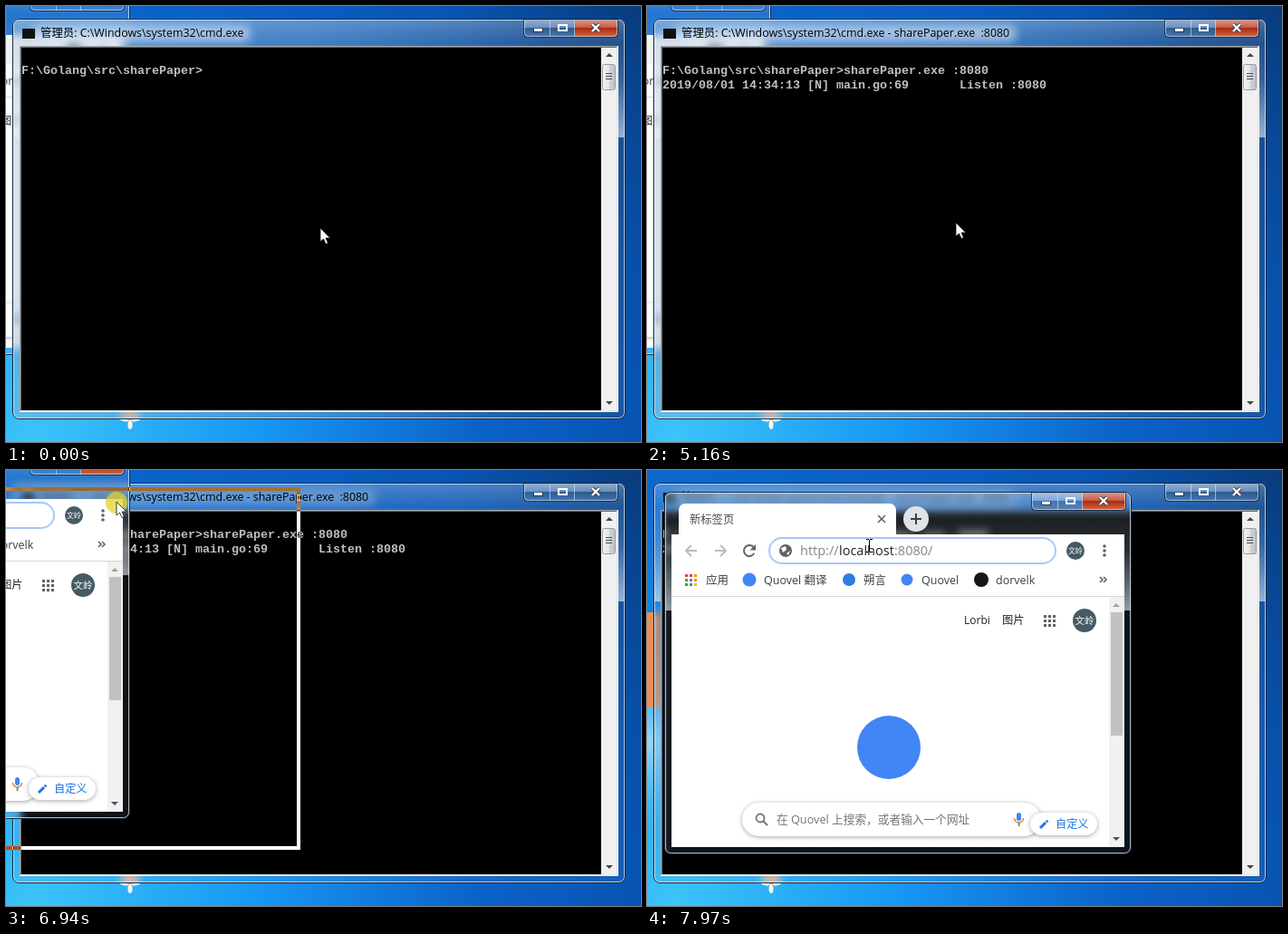
Write an HTML page with a canvas that moves like this. It is 701 by 481 pixels and loops after 8 s.

```html
<!DOCTYPE html>
<html lang="zh">
<head>
<meta charset="utf-8">
<style>
  html, body { margin: 0; width: 100%; height: 100%; overflow: hidden; background: #0c62c8; }
  canvas { display: block; }
</style>
</head>
<body>
<canvas id="stage" width="701" height="481"></canvas>
<script>
const canvas = document.getElementById('stage');
const ctx = canvas.getContext('2d');
const LOOP = 8000;
const UI = '"Open Sans", "Noto Sans CJK SC", "Noto Sans CJK", sans-serif';
const MONO = '"Liberation Mono", monospace';
const PROMPT = 'F:\\Golang\\src\\sharePaper>';
const COMMAND = 'sharePaper.exe';

// [start, typed text, caret shown]
const TYPING = [
  [0, '', 0], [360, 's', 0], [440, 'sh', 0], [530, 'sha', 0], [610, COMMAND, 0],
  [1500, COMMAND, 1], [1840, COMMAND, 0], [2020, COMMAND + ' ', 1], [2450, COMMAND + ' ', 0],
  [2580, COMMAND + ' :', 1], [3030, COMMAND + ' :', 0], [3125, COMMAND + ' :8', 1],
  [3220, COMMAND + ' :80', 0], [3480, COMMAND + ' :808', 0], [3600, COMMAND + ' :808', 1],
  [3770, COMMAND + ' :8080', 0]
];

const lerp = (a, b, p) => a + (b - a) * p;

// Progress from 0 to 1 in n equal jumps, the first at a and the last at b.
const steps = (t, a, b, n) => t < a ? 0 :
  Math.min(1, (Math.floor((t - a) / (b - a) * (n - 1) + 1e-6) + 1) / n);

function rect(x, y, w, h, fill) {
  ctx.fillStyle = fill;
  ctx.fillRect(x, y, w, h);
}
function pill(x, y, w, h, r, fill, stroke, width = 1) {
  ctx.beginPath();
  ctx.roundRect(x, y, w, h, r);
  if (fill) { ctx.fillStyle = fill; ctx.fill(); }
  if (stroke) { ctx.strokeStyle = stroke; ctx.lineWidth = width; ctx.stroke(); }
}
function disc(x, y, r, fill) {
  ctx.beginPath();
  ctx.arc(x, y, r, 0, 7);
  ctx.fillStyle = fill;
  ctx.fill();
}
function poly(points, fill) {
  ctx.beginPath();
  points.forEach(([x, y]) => ctx.lineTo(x, y));
  ctx.closePath();
  ctx.fillStyle = fill;
  ctx.fill();
}
function line(points, color, width) {
  ctx.beginPath();
  points.forEach(([x, y]) => ctx.lineTo(x, y));
  ctx.strokeStyle = color;
  ctx.lineWidth = width;
  ctx.stroke();
}
function arc(x, y, r, from, to, color, width) {
  ctx.beginPath();
  ctx.arc(x, y, r, from, to);
  ctx.strokeStyle = color;
  ctx.lineWidth = width;
  ctx.stroke();
}
function text(s, x, y, size, color, font = UI) {
  ctx.font = size + 'px ' + font;
  ctx.fillStyle = color;
  ctx.fillText(s, x, y);
}
function gradient(fill, stops) {
  stops.forEach(([at, color]) => fill.addColorStop(at, color));
  return fill;
}
function shadowPill(x, y, w, h) {
  ctx.save();
  ctx.shadowColor = 'rgba(0,0,0,.35)';
  ctx.shadowBlur = 5;
  ctx.shadowOffsetY = 1;
  pill(x, y, w, h, h / 2, '#fff');
  ctx.restore();
}

function wallpaper() {
  rect(0, 0, 701, 481, gradient(ctx.createRadialGradient(30, 480, 0, 30, 480, 820), [
    [0, '#3cc4fa'], [.3, '#1897f4'], [.6, '#0b62c8'], [.8, '#0855b4'], [1, '#083c7c']
  ]));
  disc(0, 300, 100, gradient(ctx.createRadialGradient(0, 300, 0, 0, 300, 100), [
    [0, 'rgba(200,238,255,.7)'], [1, 'rgba(120,205,250,0)']
  ]));
  rect(-90, 157, 105, 105, '#ee8f55');
  disc(137, 449, 9, '#e8b088');
  [[137, 462, 2.5, 5, 0], [130, 456, 5, 2.2, .3], [144, 456, 5, 2.2, -.3]].forEach(petal => {
    ctx.beginPath();
    ctx.ellipse(...petal, 0, 7);
    ctx.fillStyle = '#fff4e6';
    ctx.fill();
  });
}

// Blurred translucent window frame; tint is a list of colour stops from left to right.
function glass(x, y, w, h, tint = []) {
  ctx.save();
  ctx.beginPath();
  ctx.roundRect(x, y, w, h, 7);
  ctx.clip();
  ctx.save();
  ctx.resetTransform();
  ctx.filter = 'blur(4px)';
  ctx.drawImage(canvas, 0, 0);
  ctx.restore();
  rect(x, y, w, h, gradient(ctx.createLinearGradient(x, 0, x + w, 0), tint));
  const sheen = 131 / h;
  rect(x, y, w, h, gradient(ctx.createLinearGradient(0, y, 0, y + h), [
    [0, 'rgba(210,225,240,.34)'], [.06, 'rgba(190,210,230,.14)'], [sheen * .5, 'rgba(200,215,230,.22)'],
    [sheen, 'rgba(225,235,245,.65)'], [sheen, 'rgba(120,160,200,.12)'], [1, 'rgba(120,160,200,.12)']
  ]));
  ctx.restore();
  pill(x + .5, y + .5, w - 1, h - 1, 7, null, '#14263c');
  pill(x + 1.5, y + 1.5, w - 3, h - 3, 6, null, 'rgba(225,240,255,.75)');
}

function windowButtons(x, y, active) {
  pill(x, y, 103, 19, [0, 0, 4, 4], gradient(ctx.createLinearGradient(0, y, 0, y + 19), [
    [0, 'rgba(255,255,255,.4)'], [.48, 'rgba(255,255,255,.22)'], [.5, 'rgba(0,20,50,.2)'], [1, 'rgba(150,190,230,.25)']
  ]));
  if (active) pill(x + 56, y, 47, 19, [0, 0, 4, 0], gradient(ctx.createLinearGradient(0, y, 0, y + 19), [
    [0, '#dd9a8a'], [.48, '#c9573f'], [.5, '#ae2a12'], [1, '#cf6a45']
  ]));
  pill(x - .5, y + .5, 104, 19, [0, 0, 4, 4], null, 'rgba(15,30,55,.7)');
  pill(x + .5, y + .5, 102, 18, [0, 0, 4, 4], null, 'rgba(230,242,255,.55)');
  [28, 55].forEach(d => rect(x + d, y + 1, 1, 18, 'rgba(230,242,255,.55)'));
  rect(x + 10, y + 10, 11, 4, '#334');
  rect(x + 11, y + 10, 9, 3, '#fff');
  ctx.strokeStyle = '#fff';
  ctx.lineWidth = 2;
  ctx.strokeRect(x + 38, y + 6, 9, 6);
  [['#334', 4], ['#fff', 2.4]].forEach(([color, width]) => {
    line([[x + 75, y + 5], [x + 83, y + 13]], color, width);
    line([[x + 83, y + 5], [x + 75, y + 13]], color, width);
  });
}

function terminal(t) {
  const active = t < 6210;
  glass(7, 14, 677, 442, active ? [
    [0, 'rgba(170,190,210,.3)'], [.5, 'rgba(125,155,185,.3)'], [.85, 'rgba(30,65,110,.3)'], [1, 'rgba(20,50,95,.25)']
  ] : []);
  const title = '管理员: C:\\Windows\\system32\\cmd.exe' + (t >= 4150 ? ' - sharePaper.exe  :8080' : '');
  ctx.font = '12.4px ' + UI;
  const width = ctx.measureText(title).width;
  ctx.save();
  ctx.filter = 'blur(5px)';
  pill(30, 21, width + 16, 19, 8, active ? 'rgba(215,230,245,.6)' : 'rgba(190,210,230,.35)');
  ctx.restore();
  rect(18, 25, 14, 11, '#111');
  text(title, 38, 34, 12.4, '#000');
  windowButtons(572, 15, active);

  // Sunken edge around the client area.
  rect(15, 44, 661, 404, '#f4f7fa');
  rect(15, 44, 660, 403, '#a0a6ac');
  rect(16, 45, 659, 402, '#e3e3e3');
  rect(16, 45, 658, 401, '#696969');
  rect(17, 46, 640, 400, '#000');
  rect(657, 46, 17, 400, '#f0f0f0');
  pill(658.5, 64.5, 14, 28, 2, gradient(ctx.createLinearGradient(658, 0, 673, 0), [
    [0, '#f5f5f5'], [.5, '#e2e4e6'], [.52, '#cfd2d6'], [1, '#bfc3c9']
  ]), '#979ba0');
  [75, 78, 81].forEach(y => rect(662, y - 1, 7, 1, '#454b52'));
  poly([[662, 56], [666, 52], [670, 56]], '#444');
  poly([[662, 436], [670, 436], [666, 440]], '#444');

  const [, typed, caret] = TYPING.findLast(([start]) => t >= start);
  const input = PROMPT + typed;
  const mono = (s, y) => {
    ctx.font = 'bold 13.33px ' + MONO;
    ctx.fillStyle = '#c0c0c0';
    ctx.fillText(s, 17, y);
  };
  mono(input, 75);
  if (caret) rect(17 + input.length * 8, 74, 8, 4, '#c0c0c0');
  if (t >= 4320) mono('2019/08/01 14:34:13 [N] main.go:69       Listen :8080', 91);
  if (t >= 5190 && t < 5700) rect(17, 106, 8, 4, '#c0c0c0');
}

function avatar(x, y, r, size) {
  disc(x, y, r, '#455a64');
  text('文岭', x - size, y + size * .38, size, '#fff');
}

function dots(x, y, gap, size, colors) {
  for (let i = 0; i < 9; i++) {
    rect(x + i % 3 * gap, y + Math.floor(i / 3) * gap, size, size, colors[i % colors.length]);
  }
}

function toolbar(focused) {
  rect(27, 71, 500, 69, '#fff');
  [[49, -1, '#babcbe'], [81, 1, '#babcbe']].forEach(([x, d, color]) => {
    line([[x - 6 * d, 89], [x + 6 * d, 89]], color, 2);
    line([[x, 83], [x + 6 * d, 89], [x, 95]], color, 2);
  });
  arc(113, 89, 6, .5, 5.5, '#5f6368', 2);
  poly([[120, 82], [120, 88.5], [113.5, 88.5]], '#5f6368');

  if (focused) pill(135, 75, 316, 28, 14, '#fff', '#a9c7fa', 2);
  else pill(134, 75, 317, 28, 14, '#f1f3f4');
  disc(153, 89, 7, '#5f6368');
  poly([[148, 86], [153, 84], [154, 88], [150, 91]], '#fff');
  poly([[154, 92], [158, 89], [156, 94]], '#fff');
  text('http://', 169, 94, 14.5, '#80868b');
  text('localhost', 212, 94, 14.5, '#202124');
  text(':8080/', 273, 94, 14.5, '#80868b');
  avatar(473, 89, 10, 8);
  [84, 89, 94].forEach(y => disc(505, y, 1.8, '#5f6368'));

  dots(42, 115, 5, 3, ['#ea4335', '#ea4335', '#f29900', '#34a853', '#4285f4', '#f29900', '#34a853', '#34a853', '#fbbc05']);
  [[113, 7.5, '#4285f4'], [223, 7, '#2f7de0'], [287, 6.5, '#4285f4'], [369, 8, '#181717']]
    .forEach(([x, r, color]) => disc(x, 121, r, color));
  [['应用', 65], ['Quovel 翻译', 129], ['朔言', 239], ['Quovel', 303], ['dorvelk', 385]]
    .forEach(([label, x]) => text(label, x, 126, 12.5, '#3c4043'));
  [500, 504].forEach(x => line([[x, 118], [x + 3, 121], [x, 124]], '#5f6368', 1.6));
  rect(27, 139, 500, 1, '#d5d7da');
}

function page() {
  rect(27, 140, 500, 276, '#fff');
  text('Lorbi', 350, 170, 12, '#222');
  text('图片', 392, 170, 12.3, '#222');
  dots(438, 160, 5, 3, ['#5f6368']);
  avatar(483, 166, 13, 10.5);
  disc(267, 306, 35, '#4285f4');

  shadowPill(105, 367, 330, 37);
  arc(125, 384, 4.5, 0, 7, '#70757a', 1.8);
  line([[128, 387], [133, 392]], '#70757a', 2);
  text('在 Quovel 上搜索，或者输入一个网址', 143, 390, 12.7, '#757575');
  pill(408, 378, 5, 9, 2.5, '#4285f4');
  arc(410.5, 384, 5, 0, Math.PI, '#e0883a', 1.6);
  rect(409.7, 389, 1.8, 4, '#34a853');

  rect(510, 140, 17, 276, '#f1f1f1');
  rect(512, 157, 13, 136, '#c1c1c1');
  poly([[514, 151], [518, 147], [522, 151]], '#a3a3a3');
  poly([[514, 405], [522, 405], [518, 409]], '#505050');

  shadowPill(423, 378, 74, 25);
  line([[434, 395], [440, 389]], '#1a73e8', 3);
  line([[440.8, 388.2], [442.3, 386.7]], '#1a73e8', 3);
  text('自定义', 451, 395, 12.2, '#1a73e8');
}

function browser(x, y, active, focused) {
  ctx.save();
  ctx.translate(x, y);
  glass(19, 24, 516, 400);
  windowButtons(425, 25, active);
  pill(35, 37, 240, 36, [7, 7, 0, 0], '#fff');
  text('新标签页', 47, 58.5, 12.3, '#45494d');
  line([[255, 50], [263, 58]], '#5f6368', 1.6);
  line([[263, 50], [255, 58]], '#5f6368', 1.6);
  disc(297, 54, 14, '#dfe2e6');
  rect(291, 53, 12, 2, '#3c4043');
  rect(296, 48, 2, 12, '#3c4043');
  toolbar(focused);
  page();
  ctx.restore();
}

function arrow(x, y) {
  ctx.save();
  ctx.translate(x, y - 1);
  ctx.lineJoin = 'round';
  poly([[0, 0], [0, 15], [3.5, 12], [6, 17.5], [8.5, 16.5], [6, 11], [10.8, 11]], '#fff');
  ctx.strokeStyle = '#111';
  ctx.lineWidth = .8;
  ctx.stroke();
  ctx.restore();
}

function beam(x, y) {
  rect(x, y - 6, 1, 13, '#000');
  [y - 7, y + 7].forEach(end => {
    rect(x - 3, end, 3, 1, '#000');
    rect(x + 1, end, 3, 1, '#000');
  });
}

// The window is dragged as an inverted outline with a highlighted pointer.
function drag(t) {
  const p = 1 - (1 - steps(t, 6810, 7390, 14)) ** 2.66;
  const x = Math.round(lerp(-379, 19, p));
  const y = Math.round(lerp(-15, 24, p) + 61 * p * (1 - p));
  ctx.save();
  ctx.globalCompositeOperation = 'difference';
  ctx.strokeStyle = '#fff';
  ctx.lineWidth = 4;
  ctx.strokeRect(x + 2, y + 2, 512, 396);
  ctx.restore();
  disc(x + 313, y + 17, 12, 'rgba(226,212,40,.75)');
  arrow(x + 313, y + 17);
}

function pointer(t) {
  if (t < 5540) {
    const p = steps(t, 5160, 5540, 9) ** 1.76;
    arrow(Math.round(lerp(347, 60, p)), Math.round(lerp(246, -20, p)));
  } else if (t >= 6810 && t < 7610) {
    drag(t);
  } else if (t >= 7970) {
    beam(245, 83);
  } else if (t >= 7610) {
    const p = steps(t, 7790, 7970, 5);
    arrow(Math.round(lerp(332, 245, p)), Math.round(lerp(41, 83, p)));
  }
}

function draw() {
  const t = performance.now() % LOOP;
  const raised = t >= 6210;
  const [x, y] = t >= 7640 ? [0, 0] : [-398, -39];
  const showBrowser = () => browser(x, y, raised, t >= 6360);
  wallpaper();
  if (!raised) showBrowser();
  terminal(t);
  if (raised) showBrowser();
  pointer(t);
  requestAnimationFrame(draw);
}
draw();
</script>
</body>
</html>
```
